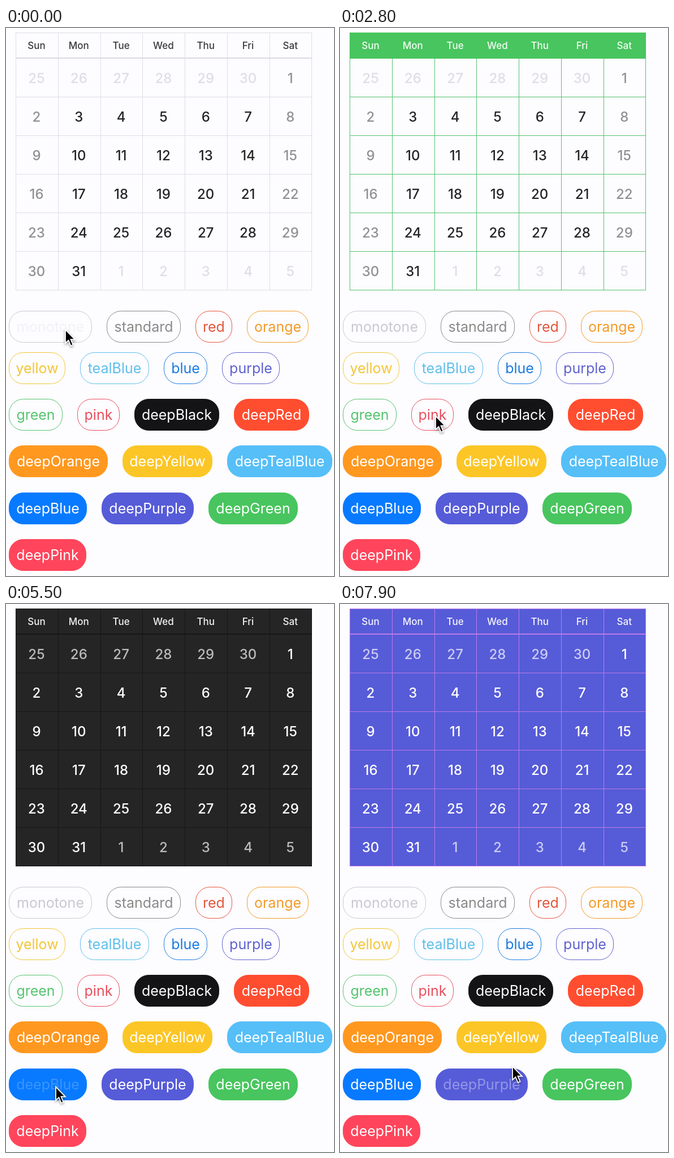
Write an HTML page that moves like this. It is 580 px wide and 965 px high and loops after 8 s.

```html
<!DOCTYPE html>
<html lang="en">
<head>
<meta charset="utf-8">
<title>Calendar themes</title>
<style>
html, body { margin: 0; width: 100%; height: 100%; overflow: hidden; background: #fdfcff; }
svg { display: block; font-family: Inter, Roboto, sans-serif; }
#calendar text { text-anchor: middle; font-weight: 500; font-size: 24px; }
#calendar .day { font-size: 17px; fill: var(--title); }
.week { fill: var(--week); }
.end { fill: var(--end); }
.out { fill: var(--out); }
#buttons text { font-size: 25px; text-anchor: middle; }
#cursor { filter: drop-shadow(0 2px 2px #0006); }
</style>
</head>
<body>
<svg width="580" height="965" viewBox="0 0 580 965">
  <g id="calendar"></g>
  <g id="buttons"></g>
  <path id="cursor" d="M0 0V24L5.5 19 9.5 28.5 13.5 27 9.5 17.5H17Z" stroke="#fff" stroke-width="1.8"/>
</svg>
<script>
const LOOP = 8000, HOLD = 100, FADE = 250;
const $ = id => document.getElementById(id);

// Light themes: [solid colour, line colour]; deep themes: [fill, grid].
const colors = {
  monotone: ['#fdfcff', '#c9c9d0'], standard: ['#8e8e93', '#8a8a88'],
  red: ['#ff4d30', '#e4553b'], orange: ['#ff981f', '#f39a25'],
  yellow: ['#fcc626', '#f3c637'], tealBlue: ['#56bff8', '#5fbfeb'],
  blue: ['#087aff', '#1a7be0'], purple: ['#565bd8', '#5f62cf'],
  green: ['#48c55e', '#55c46e'], pink: ['#ff455b', '#e84f5d'],
  deepBlack: ['#141416', '#161616'], deepRed: ['#ff4d30', '#ff9184'],
  deepOrange: ['#ff981f', '#ffc62c'], deepYellow: ['#fcc626', '#ffe27a'],
  deepTealBlue: ['#56bff8', '#a5e2ff'], deepBlue: ['#087aff', '#5abefa'],
  deepPurple: ['#565bd8', '#bd7be6'], deepGreen: ['#48c55e', '#92e59f'],
  deepPink: ['#ff455b', '#ff95a5']
};
const isDeep = name => name.startsWith('deep');

// Rows of buttons: top edge, then name and width.
const rows = [
  [498, 'monotone', 147, 'standard', 131, 'red', 65, 'orange', 109],
  [571, 'yellow', 100, 'tealBlue', 122, 'blue', 77, 'purple', 102],
  [653, 'green', 95, 'pink', 75, 'deepBlack', 150, 'deepRed', 133],
  [735, 'deepOrange', 175, 'deepYellow', 159, 'deepTealBlue', 186],
  [818, 'deepBlue', 138, 'deepPurple', 163, 'deepGreen', 158],
  [900, 'deepPink', 137]
];

// Taps: name, time of press, pointer position.
const taps = [
  ['monotone', -30, 105, 531], ['standard', 480, 245, 531], ['red', 980, 371, 529],
  ['orange', 1450, 482, 532], ['yellow', 1980, 58, 606], ['green', 2420, 56, 688],
  ['pink', 2860, 169, 683], ['tealBlue', 3220, 197, 606], ['blue', 3540, 322, 604],
  ['purple', 3850, 438, 599], ['deepRed', 4400, 470, 686], ['deepBlack', 4930, 305, 686],
  ['deepBlue', 5450, 88, 850], ['deepOrange', 6030, 100, 768], ['deepYellow', 6540, 299, 766],
  ['deepTealBlue', 6970, 488, 768], ['deepGreen', 7350, 438, 848], ['deepPurple', 7750, 305, 814]
];

function theme(name) {
  const [main, line] = colors[name];
  if (isDeep(name)) return {
    bg: name === 'deepBlack' ? '#252525' : main, line, head: 'none', rule: line,
    title: '#fffffff0', week: '#fff', end: '#fff', out: '#ffffffb0'
  };
  const mono = name === 'monotone';
  return {
    bg: '#fdfcff', line: mono ? '#dedee5' : line, head: mono ? 'none' : main,
    rule: mono ? '#d9d9e2' : main, title: mono ? '#3a3a3a' : '#fffffff0',
    week: '#252525', end: '#919193', out: '#dedee5'
  };
}

function buildCalendar() {
  let grid = '', text = '';
  const label = (col, y, cls, s) =>
    text += `<text x="${54 + 74.8 * col}" y="${y}" class="${cls}">${s}</text>`;
  for (let i = 0; i < 8; i++) grid += `M${Math.round(17 + 74.75 * i) + .5} 8V462`;
  for (const y of [8, 122, 190, 258, 326, 394, 462]) grid += `M17 ${y - (y > 8) + .5}H541`;
  ['Sun', 'Mon', 'Tue', 'Wed', 'Thu', 'Fri', 'Sat'].forEach((d, i) => label(i, 36.5, 'day', d));
  for (let i = 0; i < 42; i++) {
    const n = i - 5, col = i % 7;
    const cls = n < 1 || n > 31 ? 'out' : col % 6 ? 'week' : 'end';
    label(col, 97 + 68 * Math.floor(i / 7), cls, n < 1 ? n + 30 : n > 31 ? n - 31 : n);
  }
  $('calendar').innerHTML = `<path fill="var(--bg)" d="M17 8H541V462H17Z"/>
    <path d="${grid}" fill="none" stroke="var(--line)"/>
    <path fill="var(--head)" d="M17 8H541V53H17Z"/>
    <path fill="var(--rule)" d="M17 52H541V54H17Z"/>${text}`;
}

function buildButtons() {
  let html = '';
  for (const [y, ...items] of rows) {
    for (let i = 0, x = 5; i < items.length; i += 2) {
      const name = items[i], w = items[i + 1], [main, line] = colors[name], deep = isDeep(name);
      html += `<rect x="${x + .5}" y="${y + .5}" width="${w - 1}" height="55" rx="25"
        fill="${deep ? main : 'none'}" stroke="${deep ? main : line}"/>
        <text id="${name}" x="${x + w / 2}" y="${y + 37}" fill="${deep ? '#fff' : line}">${name}</text>`;
      x += w + 26;
    }
  }
  $('buttons').innerHTML = html;
}

const clamp = v => Math.min(1, Math.max(0, v));
const ease = u => u * u * (3 - 2 * u);
let shown;

function draw(now) {
  const t = now % LOOP;
  let current = 'monotone', [, , x, y] = taps[0];
  taps.forEach(([name, press, px, py], i) => {
    const released = t - press - HOLD;
    $(name).setAttribute('opacity', t < press ? 1 : .2 + .8 * clamp(released / FADE));
    if (released >= 0) current = name;
    if (!i) return;
    const start = taps[i - 1][1] + 150, u = ease(clamp((t - start) / (press - 60 - start)));
    x += (px - x) * u;
    y += (py - y) * u;
  });
  if (current !== shown) {
    shown = current;
    for (const [key, value] of Object.entries(theme(current)))
      $('calendar').style.setProperty('--' + key, value);
  }
  $('cursor').setAttribute('transform', `translate(${x} ${y})`);
}

buildCalendar();
buildButtons();
const begin = performance.now();
function frame() {
  draw(performance.now() - begin);
  requestAnimationFrame(frame);
}
frame();
</script>
</body>
</html>
```
